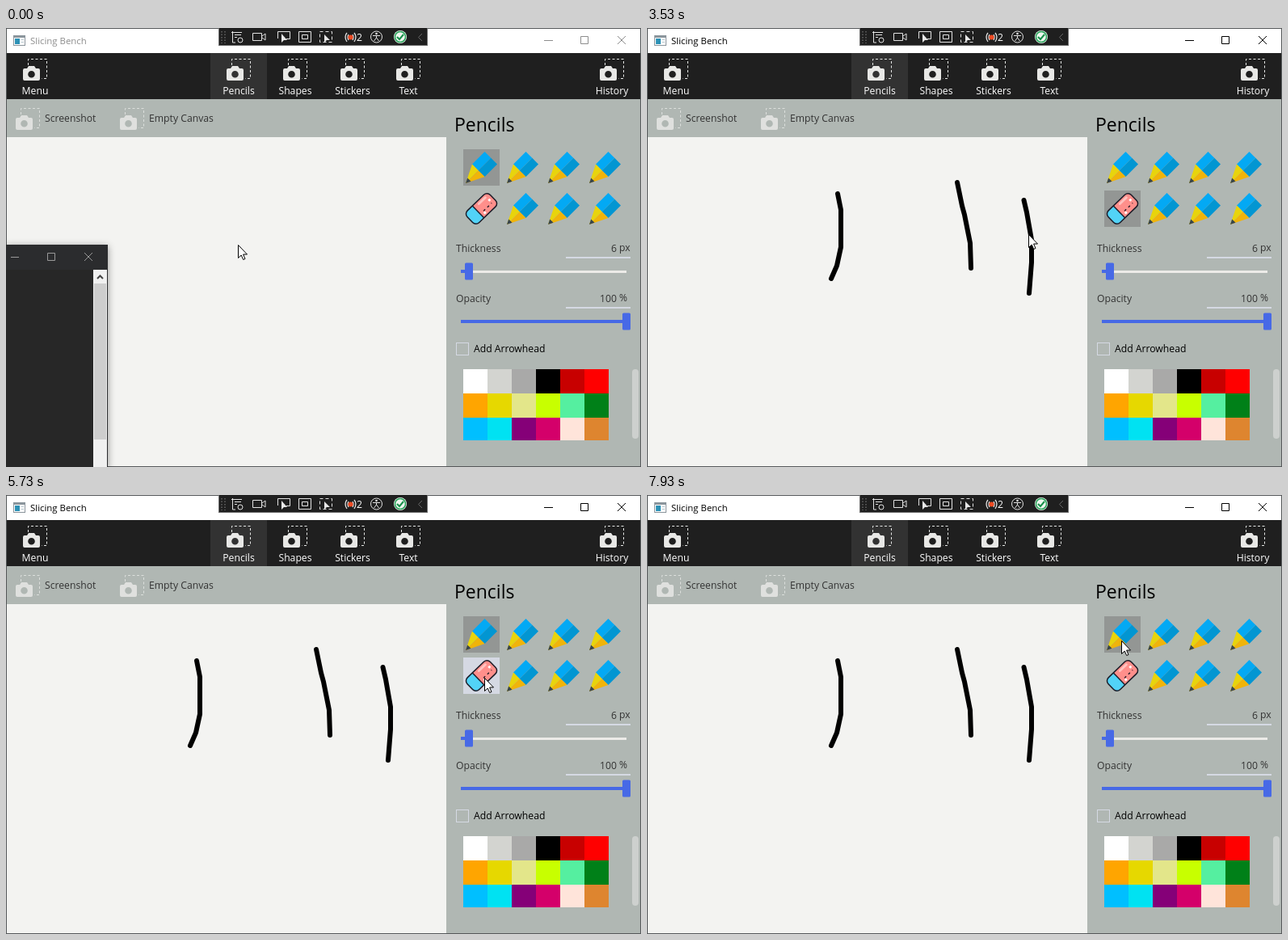
Animation of 786 by 543 pixels, one loop 8 s. Source, as an HTML page:

```html
<!DOCTYPE html>
<html lang="en">
<head>
<meta charset="utf-8">
<title>Slicing Bench</title>
<style>
  html, body { margin: 0; width: 100%; height: 100%; overflow: hidden; background: #fff; }
  svg { display: block; }
  text { font: 12.2px "Open Sans", "Noto Sans", sans-serif; fill: #333; }
  .title { font-size: 11.4px; }
  .line { fill: none; stroke: #e2e2e2; }
  .tab text { fill: #fff; text-anchor: middle; }
  .ink { fill: none; stroke: #000; stroke-width: 6; stroke-linecap: round; stroke-linejoin: round; }
  #console { filter: drop-shadow(0 2px 5px rgba(0, 0, 0, .4)); }
</style>
</head>
<body>
<svg width="786" height="543" viewBox="0 0 786 543">
  <defs>
    <g id="camera">
      <path d="M6.500 8V.5H29.500V24.500H23" fill="none" stroke="#e4e6e4" stroke-dasharray="3 2.500"/>
      <path fill="#e8e8e6" fill-rule="evenodd" d="M2 12H5L7 9H14L16 12H19Q21 12 21 14V25Q21 27 19 27H2Q0 27 0 25V14Q0 12 2 12ZM10.500 15A4.300 4.300 0 1 0 10.500 23.600A4.300 4.300 0 1 0 10.500 15Z"/>
    </g>
    <g id="pencil">
      <path fill="#03a9f4" d="M11 18.500L26.500 3L34.300 10.700L18.700 26.300Z"/>
      <path fill="#0296d2" d="M34.300 10.700L42 18.500L26.500 34L18.700 26.300Z"/>
      <path fill="#e8d40c" d="M11 18.500L3 42L18.700 26.300Z"/>
      <path fill="#f0b40a" d="M18.700 26.300L26.500 34L3 42Z"/>
      <path fill="#37444d" d="M5.200 35.500L9.500 39.800L3 42Z"/>
    </g>
    <g id="eraser" transform="translate(22.500 22.500) rotate(-44) scale(.94)">
      <rect x="-21" y="-11" width="42" height="22" rx="6" fill="#ff8f8b"/>
      <path d="M-6 -11H-15Q-21 -11 -21 -5V5Q-21 11 -15 11H-6Z" fill="#52d3f7"/>
      <path d="M-6 -11V11" stroke="#1c1c28" stroke-width="1.500"/>
      <path d="M2 -7H14" stroke="#ffc3c0" stroke-width="3" stroke-linecap="round"/>
      <path d="M0 4H15" stroke="#241b26" stroke-width="1.500" stroke-dasharray="3 4"/>
      <path d="M-2 7H1M14 -1H17" stroke="#fff" stroke-width="3"/>
      <rect x="-21" y="-11" width="42" height="22" rx="6" fill="none" stroke="#1c1c28" stroke-width="1.600"/>
    </g>
  </defs>

  <rect width="786" height="543" fill="#55585a"/>
  <rect x="1" y="1" width="784" height="30" fill="#fff"/>
  <rect x="9.500" y="9.500" width="14" height="12" fill="#fff" stroke="#8b959c"/>
  <path d="M10 11H23" stroke="#8b959c" stroke-width="2"/>
  <rect x="11" y="13" width="6" height="7" fill="#2c91b5"/>
  <path d="M18.500 14.500H22M18.500 17.500H22" stroke="#b5c4cc"/>
  <text class="title" id="title" x="30" y="20">Slicing Bench</text>
  <path id="controls" fill="none" d="M666 15.500H677M711.500 10.500H720.500V19.500H711.500ZM757 10L767 20M767 10L757 20"/>

  <rect x="1" y="31" width="784" height="57" fill="#1f1f1f"/>
  <rect x="253" y="31" width="70" height="57" fill="#323232"/>
  <g class="tab" id="tabs"></g>

  <rect x="1" y="88" width="784" height="454" fill="#b0b7b3"/>
  <rect x="1" y="135" width="544" height="407" fill="#f3f3f1"/>
  <g opacity=".85"><use href="#camera" x="12" y="99"/><use href="#camera" x="141" y="99"/></g>
  <text x="48" y="116">Screenshot</text>
  <text x="177" y="116">Empty Canvas</text>

  <rect x="263.500" y="-.5" width="258" height="22" fill="#1f1f1f" stroke="#6a6a6a"/>
  <path d="M267 4V19M271 4V19" stroke="#666" stroke-width="1.500" stroke-dasharray="1.500 2"/>
  <path class="line" d="M279 5.500H292M280.500 4V18H284M283 8.500H291M283 11.500H286"/>
  <circle class="line" cx="290" cy="15" r="3"/>
  <path class="line" d="M305.500 6.500H316.500V15.500H305.500ZM317 10L321 7V15L317 12"/>
  <path class="line" d="M336.500 13V4.500H351.500V13.500H347M362.500 4.500H377.500V17.500H362.500ZM366.500 8.500H373.500V13.500H366.500Z"/>
  <rect class="line" x="388.500" y="4.500" width="15" height="13" stroke-dasharray="4 3"/>
  <path d="M341 7V18L344 15H348ZM394 8V18L397 15H401Z" fill="#e8e8e8"/>
  <path class="line" d="M422 6Q418 11 422 17M431 6Q435 11 431 17M424 8Q422 11 424 15M429 8Q431 11 429 15" stroke-width="1.300"/>
  <circle cx="426.500" cy="11.500" r="3" fill="#ee4b23"/>
  <text x="434" y="16" style="fill:#fff">2</text>
  <circle class="line" cx="458.500" cy="11" r="7"/>
  <path class="line" d="M454 9.500H463M458.500 9V12L455.500 16M458.500 12L461.500 16"/>
  <circle cx="458.500" cy="7" r="1.300" fill="#e2e2e2"/>
  <circle cx="488" cy="11" r="8" fill="#eef7ef"/>
  <circle cx="488" cy="11" r="6.500" fill="none" stroke="#27a35a" stroke-width="1.500"/>
  <path d="M484 11L487 14L492 8" fill="none" stroke="#16904a" stroke-width="2"/>
  <path d="M515 7L510.500 11.500L515 16" fill="none" stroke="#666"/>

  <text x="555" y="128" style="font-size:23px;fill:#000">Pencils</text>
  <rect id="penCell" x="566" y="150" width="45" height="45"/>
  <rect id="rubCell" x="566" y="201" width="45" height="45"/>
  <g id="tools"></g>
  <text x="557" y="277">Thickness</text>
  <text x="756" y="277" text-anchor="end">6</text><text x="759" y="276">px</text>
  <text x="557" y="339">Opacity</text>
  <text x="756" y="339" text-anchor="end">100</text><text x="759" y="338">%</text>
  <path d="M693 284H773M693 346H773" stroke="#d5d9e3" stroke-width="2"/>
  <path d="M563 301.500H768" stroke="#ecebe8" stroke-width="3"/>
  <path d="M563 301H570M563 363H768" stroke="#4769e6" stroke-width="4"/>
  <rect x="568" y="290.500" width="10" height="21" rx="1.500" fill="#4769e6"/>
  <rect x="763" y="352.500" width="10" height="21" rx="1.500" fill="#4769e6"/>
  <rect x="557.500" y="389.500" width="15" height="15" fill="none" stroke="#d5d9e3"/>
  <text x="579" y="401" style="fill:#000">Add Arrowhead</text>
  <svg id="swatches" x="566" y="422" width="180" height="88"></svg>
  <rect x="775" y="422" width="8" height="86" rx="4" fill="#cdd0ce"/>

  <polyline class="ink"/><polyline class="ink"/><polyline class="ink"/>

  <g id="console">
    <rect y="268" width="126" height="275" fill="#2b2c2e"/>
    <rect y="299" width="108" height="244" fill="#272727"/>
    <rect x="108" y="299" width="17" height="244" fill="#f0f0f0"/>
    <rect x="109" y="316" width="15" height="193" fill="#cdcdcd"/>
    <path d="M6 283.500H16M51.500 278.500H60.500V287.500H51.500ZM97 278L107 288M107 278L97 288" fill="none" stroke="#999"/>
    <path d="M113 310L116.500 306.500L120 310" fill="none" stroke="#444" stroke-width="2"/>
  </g>
  <path id="cursor" d="M.5 .5V16.500L4.200 13L6.700 18.500L9 17.500L6.600 12H11.500Z" fill="#fff" stroke="#000"/>
</svg>

<script>
const LOOP = 8000, TICKS_PER_SECOND = 15, TICKS = 120;
const $ = id => document.getElementById(id);

const tabs = { Menu: 21, Pencils: 273, Shapes: 343, Stickers: 414, Text: 483, History: 735 };
$('tabs').innerHTML = Object.entries(tabs)
  .map(([label, x]) => `<use href="#camera" x="${x}" y="38"/><text x="${x + 15}" y="82">${label}</text>`).join('');

$('tools').innerHTML = Array.from({ length: 8 }, (_, i) =>
  `<use href="#${i === 4 ? 'eraser' : 'pencil'}" x="${566 + i % 4 * 51}" y="${150 + (i >> 2) * 51}"/>`).join('');

$('swatches').innerHTML = ['#fff', '#d3d4d0', '#a9a9a8', '#000', '#c80000', '#f00',
  '#ffa500', '#e6d800', '#e3e68a', '#c8ff00', '#55efa0', '#008018',
  '#00bfff', '#00e2f2', '#850078', '#d4006a', '#ffe4da', '#de852f']
  .map((c, i) => `<rect x="${i % 6 * 30}" y="${(i / 6 | 0) * 30}" width="30" height="30" fill="${c}"/>`).join('');

// Places the cursor visits
const START = [287, 268], REST = [578, 250], ERASER = [592, 226], INK = [472, 255], PEN = [587, 180];

const strokes = [
  { start: 8, end: 14, points: [[236, 205], [240, 225], [240, 271], [235, 294], [228, 310]] },
  { start: 15, end: 16, points: [[384, 191], [390, 220], [393, 231], [400, 266], [401, 297]] },
  { start: 17, end: 21, points: [[466.5, 213], [470, 228], [476, 262], [476, 290], [473, 328]] }
];

// Each round: pick the eraser, rub out the last stroke, click the pencil to bring it back
const picks = [27, 35, 51, 68, 78, 88, 99, 107, 123];
const rounds = picks.slice(0, -1).map((pick, i) => {
  const reach = pick + 2, back = picks[i + 1] - 4;
  return { pick, reach, back, erase: Math.round(reach + (back - reach) * .4) };
});

const keys = [];
const addKey = (tick, point, ease = p => p) => keys.push({ tick, point, ease });
const easeOut = p => 1 - (1 - p) ** 2;
const stay = (from, to, point) => { addKey(from, point, easeOut); addKey(to, point); };

stay(0, 1, START);
for (const { start, end, points } of strokes)
  points.forEach((point, i) => addKey(start + (end - start) * i / (points.length - 1), point));
stay(22, 25, REST);
for (const { pick, reach, erase, back } of rounds) {
  stay(pick - 2, pick, ERASER);
  stay(reach, erase, INK);
  stay(Math.min(erase + 2, back), back, PEN);
}

function cursorAt(tick) {
  const next = keys.findIndex(k => k.tick > tick);
  if (next < 1) return keys.at(next).point;
  const a = keys[next - 1], b = keys[next];
  const p = b.ease((tick - a.tick) / (b.tick - a.tick));
  return a.point.map((v, i) => Math.floor(v + (b.point[i] - v) * p));
}

const inCell = ([x, y], top) => x >= 566 && x < 611 && y >= top && y < top + 45;

// The hover colour follows the cursor one tick late
function paintCell(id, top, selected, tick) {
  const hover = inCell(cursorAt(tick), top) && inCell(cursorAt(tick - 1), top);
  $(id).setAttribute('fill', selected ? '#939694' : hover ? '#d5d9e3' : 'none');
}

const inks = document.querySelectorAll('.ink');
function paintStroke(ink, { start, end }, tick, hidden) {
  ink.style.display = tick > start && !hidden ? '' : 'none';
  const points = keys.filter(k => k.tick >= start && k.tick <= Math.min(end, tick)).map(k => k.point);
  if (tick < end) points.push(cursorAt(tick));
  ink.setAttribute('points', points.join(' '));
}

let shown = -1;
function frame(now) {
  const tick = Math.floor((now % LOOP + 4) * TICKS_PER_SECOND / 1000) % TICKS;
  if (tick !== shown) {
    shown = tick;
    const active = tick >= 1;
    const erasing = rounds.some(r => tick >= r.pick && tick < r.back);
    const erased = rounds.some(r => tick >= r.erase && tick < r.back);
    $('console').style.display = active ? 'none' : '';
    $('title').style.fill = active ? '#000' : '#8d8d8d';
    $('controls').setAttribute('stroke', active ? '#000' : '#8d8d8d');
    paintCell('penCell', 150, !erasing, tick);
    paintCell('rubCell', 201, erasing, tick);
    strokes.forEach((stroke, i) => paintStroke(inks[i], stroke, tick, i === 2 && erased));
    $('cursor').setAttribute('transform', `translate(${cursorAt(tick)})`);
  }
  requestAnimationFrame(frame);
}
frame(performance.now());
</script>
</body>
</html>
```
